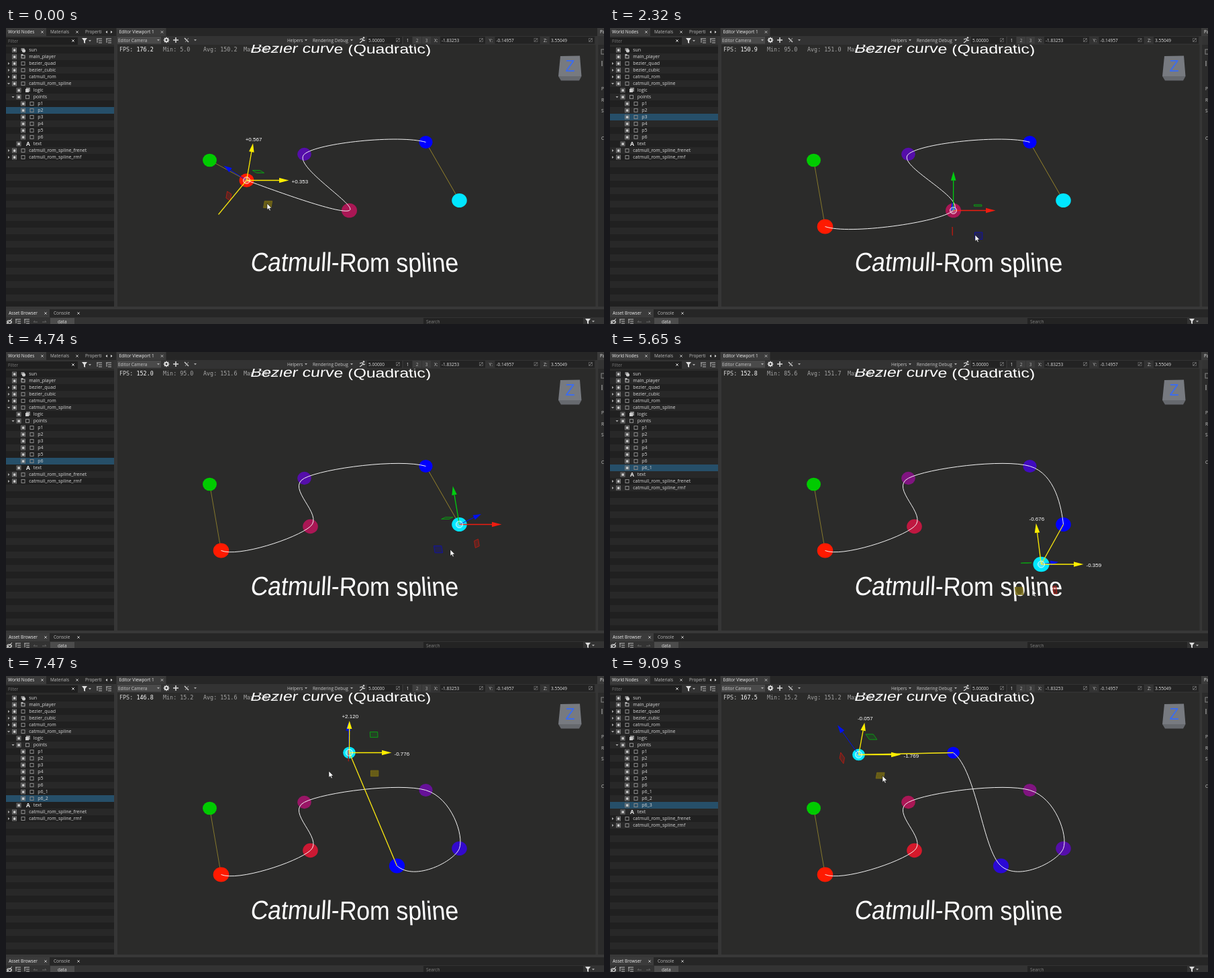
An HTML page with a canvas that plays this animation: 891 by 442 pixels, repeating every 9.19 s.

```html
<!DOCTYPE html>
<html lang="en">
<head>
<meta charset="utf-8">
<title>Catmull-Rom spline editor</title>
<style>
html, body { margin: 0; width: 100%; height: 100%; overflow: hidden; background: #2b2b2a; }
canvas { display: block; }
</style>
</head>
<body>
<canvas id="stage" width="891" height="442"></canvas>
<script>
const ctx = document.getElementById('stage').getContext('2d');
const LOOP = 9190, STEP = 100;
const UI = '"Open Sans", "Noto Sans", sans-serif';
const ARIAL = '"Liberation Sans", Arial, sans-serif';
const MONO = '"DejaVu Sans Mono", monospace';

const home = [[303, 197], [320, 296], [511, 272], [444, 188], [625, 170], [675, 257]];
// Each edit picks a point (new ones are duplicates), then drags it along a path.
const edits = [
  { point: 1, pick: 0, from: 0, to: 1000, origin: [316, 278], path: [[358, 227], home[1]], grip: [31, 35], unit: [119, 90] },
  { point: 2, pick: 1700, from: 2600, to: 3600, path: [home[2], [525, 266], [423, 255], [453, 260]], grip: [33, 37], unit: [93, 93] },
  { point: 5, pick: 4100 },
  { point: 6, pick: 4900, from: 5000, to: 5900, path: [home[5], [702, 350], [582, 283]], grip: [-13, 38], unit: [92, 88] },
  { point: 7, pick: 6100, from: 6600, to: 7500, path: [[582, 283], [511, 114]], grip: [-30, 28], unit: [91.5, 79.7] },
  { point: 8, pick: 7800, from: 8450, to: LOOP, path: [[511, 114], [370, 117]], grip: [36, 32], unit: [79.7, 53] }
];
const drags = edits.filter(e => e.path);

const clamp = u => Math.min(1, Math.max(0, u));
const smooth = u => u * u * (3 - 2 * u);
const add = (a, b) => [a[0] + b[0], a[1] + b[1]];
const mix = (a, b, u) => [a[0] + (b[0] - a[0]) * u, a[1] + (b[1] - a[1]) * u];

function pointAt(i, t) {
  const drag = drags.find(d => d.point === i);
  if (!drag) return home[i];
  const { path, from, to } = drag, last = path.length - 1;
  const u = clamp((t - from) / (to - STEP - from)) * last;
  const k = Math.min(last - 1, Math.floor(u));
  return mix(path[k], path[k + 1], smooth(u - k));
}

// Between drags the cursor goes to the next handle, by way of the tree if a row is clicked.
function cursorAt(t) {
  const next = drags.findIndex(d => d.to > t);
  const { point, from, grip, path } = drags[next];
  if (t >= from) return add(pointAt(point, t), grip);
  const before = drags[next - 1];
  const release = add(pointAt(before.point, t), before.grip);
  const handle = add(path[0], grip), arrive = from - 400;
  const click = edits.find(e => e.pick > before.to && e.point < home.length);
  if (!click || click.pick > from) return mix(release, handle, clamp((t - before.to) / (arrive - before.to)));
  const row = [51, 114 + click.point * 10], reach = click.pick - 200;
  return t < click.pick
    ? mix(release, row, clamp((t - before.to) / (reach - before.to)))
    : mix(row, handle, clamp((t - click.pick) / (arrive - click.pick)));
}

function rect(x, y, w, h, color) { ctx.fillStyle = color; ctx.fillRect(x, y, w, h); }
function frame(x, y, w, h, color) {
  ctx.strokeStyle = color; ctx.lineWidth = 1; ctx.strokeRect(x, y, w, h);
}
function label(s, x, y, color = '#c8c8c8', font = '6.5px ' + UI, align = 'left') {
  ctx.font = font; ctx.textAlign = align; ctx.fillStyle = color; ctx.fillText(s, x, y);
}
function path(pts, close) {
  ctx.beginPath();
  pts.forEach(([x, y]) => ctx.lineTo(x, y));
  if (close) ctx.closePath();
}
function poly(pts, color) { path(pts, true); ctx.fillStyle = color; ctx.fill(); }
function line(pts, color, width = 1) {
  path(pts); ctx.strokeStyle = color; ctx.lineWidth = width; ctx.stroke();
}
function disc(x, y, rx, ry, color) {
  ctx.beginPath(); ctx.ellipse(x, y, rx, ry, 0, 0, 7); ctx.fillStyle = color; ctx.fill();
}
const down = (x, y, c = '#aaa') => poly([[x - 2, y - 1], [x + 2, y - 1], [x, y + 1.5]], c);
const side = (x, y, d, c = '#aaa') => poly([[x - d, y - 2], [x + 1.5 * d, y], [x - d, y + 2]], c);
function cross(x, y, c = '#bbb') {
  line([[x - 1.7, y - 1.7], [x + 1.7, y + 1.7]], c);
  line([[x - 1.7, y + 1.7], [x + 1.7, y - 1.7]], c);
}
function funnel(x, y) {
  poly([[x - 4, y - 4], [x + 4, y - 4], [x + 1, y], [x + 1, y + 4], [x - 1, y + 3], [x - 1, y]], '#ddd');
  down(x + 8, y);
}
function treeIcon(x, y) {
  for (const d of [-3, 0, 3]) line([[x - (d < 0 ? 4 : 1), y + d], [x + 4, y + d]], '#bbb');
  line([[x - 3, y - 3], [x - 3, y + 3]], '#bbb');
}

// Text standing in perspective: verticals converge above the middle of the view.
function slantedText(s, x, y, size, sy, depth) {
  ctx.font = size + 'px ' + ARIAL; ctx.textAlign = 'left'; ctx.fillStyle = '#fff';
  const x0 = x;
  for (const ch of s) {
    ctx.setTransform(1, 0, (x - 540) / depth, sy, x, y + (x - x0) * .004);
    ctx.fillText(ch, 0, 0);
    x += ctx.measureText(ch).width;
  }
  ctx.resetTransform();
}

const nodeIcons = {
  sun(x, y) { rect(x - 3, y - 3, 5, 4, '#888'); disc(x + 1, y + 1, 2.6, 2.6, '#ccc'); },
  main_player(x, y) { frame(x - 2.5, y - 2, 5, 4, '#bbb'); rect(x - 3, y - 4, 3, 2, '#bbb'); },
  logic(x, y) { rect(x - 2, y - 4, 6, 6, '#888'); rect(x - 3, y - 2, 5, 5, '#ccc'); },
  text(x, y) { label('A', x + 1, y + 3, '#eee', 'bold 8.5px ' + UI, 'center'); }
};

function drawTree(selected, count) {
  for (let y = 28, i = 0; y < 416; y += 10, i++) rect(0, y, 161, 10, i % 2 ? '#282828' : '#202020');
  rect(0, 108 + selected * 10, 161, 10, '#264f69');
  const names = Array.from({ length: count }, (_, i) => i < 6 ? 'p' + (i + 1) : 'p6_' + (i - 5));
  // Leading spaces give the depth, + and - the state of a branch.
  const rows = ['sun', 'main_player', '+bezier_quad', '+bezier_cubic', '+catmull_rom',
    '-catmull_rom_spline', ' logic', ' -points', ...names.map(s => '  ' + s), ' text',
    '+catmull_rom_spline_frenet', '+catmull_rom_spline_rmf'];
  rows.forEach((row, i) => {
    const [, indent, state, name] = row.match(/^( *)([+-]?)(.*)/);
    const x = 12.5 + indent.length * 6.5, y = 33 + i * 10;
    if (state === '-') down(x - 8.5, y);
    if (state === '+') side(x - 8.5, y, 1);
    frame(x - 3, y - 3, 6, 6, '#777');
    rect(x - 1.7, y - 1.7, 3.6, 3.6, '#ccc');
    if (nodeIcons[name]) nodeIcons[name](x + 13, y);
    else frame(x + 10.5, y - 2.5, 5, 5, '#8b8b8b');
    label(name, x + 21.7, y + 2.3, '#d8d8d8', '7px ' + UI);
  });
}

function tab(x, w, s, active, y = 0, closable = true) {
  if (active) rect(x, y, w, 12, '#3b3b3b');
  label(s, x + 4, y + 8.3, active ? '#eee' : '#bbb');
  if (closable) cross(x + w - 6, y + 6);
}
function field(x, w, s) {
  rect(x, 13, w, 10.5, '#232323');
  label(s, x + 2, 20.5, '#ddd');
  frame(x + w - 8.5, 15.5, 5, 5, '#555');
  line([[x + w - 8, 20], [x + w - 4, 16]], '#888');
}
function menu(s, x, arrowX) { label(s, x, 20.5); down(arrowX, 18); }

function drawToolbar() {
  rect(166, 13, 65, 10.5, '#4a4a4a');
  menu('Editor Camera', 167, 227);
  for (let a = 0; a < 4; a++) {
    const c = Math.cos(a * Math.PI / 4) * 4.3, s = Math.sin(a * Math.PI / 4) * 4.3;
    line([[239 - c, 18 - s], [239 + c, 18 + s]], '#ddd', 1.6);
  }
  disc(239, 18, 3.2, 3.2, '#ddd'); disc(239, 18, 1.4, 1.4, '#333');
  line([[249, 18], [257, 18]], '#ddd', 1.5); line([[253, 14], [253, 22]], '#ddd', 1.5);
  line([[266, 15], [272, 21]], '#ccc', 1.5); line([[267, 21], [272, 15]], '#999');
  down(282, 18);
  menu('Helpers', 419, 447);
  menu('Rendering Debug', 457, 515);
  disc(533, 14.5, 1.3, 1.3, '#ddd');
  line([[527, 17], [531, 16], [533, 19], [535, 18]], '#ddd', 1.2);
  line([[532, 17], [530, 20], [527, 22]], '#ddd', 1.2);
  field(538, 52, '5.00000');
  for (let i = 0; i < 3; i++) {
    rect(592 + i * 14, 13, 13, 10.5, i ? '#3d3d3d' : '#292929');
    label(i + 1, 598.5 + i * 14, 20.5, i ? '#aaa' : '#ddd', undefined, 'center');
  }
  ['X-1.83253', 'Y-0.14957', 'Z3.55049'].forEach((s, i) => {
    label(s[0] + ':', 638 + i * 81.5, 20.5);
    field(647 + i * 81.5, 67, s.slice(1));
  });
}

function drawChrome() {
  rect(0, 0, 891, 12, '#262626');
  rect(0, 12, 891, 13, '#333');
  tab(-1, 61, 'World Nodes', true);
  tab(62, 50, 'Materials');
  tab(114, 30, 'Properti', false, 0, false);
  rect(145, 0, 17, 12, '#262626');
  side(150, 6, -1, '#ddd'); side(157, 6, 1, '#ddd');
  tab(164.5, 74, 'Editor Viewport 1', true);

  rect(0, 14, 107, 11, '#1f1f1f');
  label('Filter', 3, 22, '#777');
  cross(100, 19, '#ddd');
  funnel(117, 19); treeIcon(139, 19); treeIcon(153, 19);
  rect(161, 12, 5, 406, '#363636');
  drawToolbar();

  rect(878.5, 12, 4, 406, '#363636');
  rect(882.5, 25, 9, 393, '#2b2b2b');
  tab(881, 20, 'Pa', true, 0, false);
  frame(887, 32, 8, 7, '#888');
  line([[888, 49], [888, 57]], '#bbb');
  [...'PRS'].forEach((s, i) => label(s, 887, 93 + i * 16.5));
  label('C', 887, 167);

  rect(0, 416, 891, 4, '#383838');
  rect(0, 420, 891, 12, '#262626');
  tab(0, 65, 'Asset Browser', true, 420);
  tab(67, 47, 'Console', false, 420);
  rect(0, 432, 891, 10, '#333');
  disc(5, 439, 4, 3, '#bbb'); disc(5, 439, 2, 1.8, '#333');
  line([[1, 442], [9, 434]], '#ddd');
  treeIcon(18, 438); treeIcon(31, 438);
  line([[47, 439], [41, 439], [43, 437]], '#666');
  line([[54, 439], [60, 439], [58, 437]], '#666');
  rect(66, 433, 36, 9, '#4c4c4c');
  label('data', 77, 440.5, '#ddd');
  rect(622, 433, 238, 9, '#232323');
  label('Search', 626, 441, '#808080');
  funnel(867, 438);
}

function drawStats(t) {
  const noise = Math.sin(Math.floor(t / 300) * 12.9898) * 43758.5453 % 1;
  const fps = 150.2 + 4 * noise + 26 * Math.exp(-t / 250) + 18 * Math.exp((t - LOOP) / 300);
  const min = t < 1700 ? 5 : t < 5200 ? 95 : t < 6600 ? 85.6 : 15.2;
  const avg = 150.2 + 1.5 * Math.sin(Math.PI * t / 12000);
  const mono = (s, x, c = '#a5a5a5') => label(s, x, 35, c, '8.4px ' + MONO);
  mono('FPS:', 169, '#d0d0d0'); mono(fps.toFixed(1), 194.5, '#fff');
  mono('Min: ' + min.toFixed(1), 234);
  mono('Avg: ' + avg.toFixed(1), 294);
  mono('Max: 242.1', 354);
}

function drawCube() {
  poly([[826, 42], [855, 41.5], [857.5, 72], [823, 72]], '#777a80');
  poly([[823, 72], [857.5, 72], [854, 78.5], [827, 78.5]], '#66696e');
  label('Z', 840.5, 65, '#3b6cf0', '23px ' + ARIAL, 'center');
}

function dotColor(i, count) {
  if (i === 0) return '#00cb00';
  if (i === count - 1) return '#00e6ff';
  const u = (i - 1) / (count - 3);
  return `rgb(${255 * (1 - u)}, ${26 * (1 - u * u)}, ${255 * u})`;
}

function drawSpline(pts) {
  const n = pts.length;
  line([pts[0], pts[1]], '#85782c');
  line([pts[n - 2], pts[n - 1]], '#94822a');
  for (let k = 0; k < n; k++) {
    const i = (k + n - 1) % n, r = 7.8 + pts[i][1] * .0135;
    disc(...pts[i], r, r * .94, dotColor(i, n));
  }
  ctx.beginPath();
  ctx.moveTo(...pts[1]);
  for (let i = 1; i < n - 2; i++) {
    const [a, b, c, d] = pts.slice(i - 1, i + 3);
    ctx.bezierCurveTo(b[0] + (c[0] - a[0]) / 6, b[1] + (c[1] - a[1]) / 6,
      c[0] - (d[0] - b[0]) / 6, c[1] - (d[1] - b[1]) / 6, ...c);
  }
  ctx.strokeStyle = '#f4f4f4'; ctx.lineWidth = 1; ctx.stroke();
}

function arrow([x, y], [dx, dy], color, width) {
  const len = Math.hypot(dx, dy), ux = dx / len, uy = dy / len;
  const base = len - Math.min(len, Math.max(12, len * .23));
  const bx = x + ux * base, by = y + uy * base;
  line([[x, y], [bx, by]], color, width);
  poly([[x + dx, y + dy], [bx - uy * 3.8, by + ux * 3.8], [bx + uy * 3.8, by - ux * 3.8]], color);
}

function drawGizmo(p, drag) {
  const [x, y] = p;
  const ax = [63, 0];
  const ay = [(515 - x) / 16.5, -44 - (y - 60) * .067];
  const az = [(x - 520) * .21, (y - 333) * .205];
  const facing = x > 540 ? -.6 : .6;
  const plane = (a, ka, b, kb, color, fill) => {
    const corner = (s, q) => [
      x + a[0] * (ka + s) + b[0] * (kb + q), y + a[1] * (ka + s) + b[1] * (kb + q)];
    const k = .09;
    ctx.globalAlpha = fill;
    poly([corner(-k, -k), corner(k, -k), corner(k, k), corner(-k, k)], color);
    ctx.globalAlpha = 1;
    ctx.strokeStyle = color; ctx.lineWidth = 1; ctx.stroke();
  };
  arrow(p, az, '#0010f0', 1);
  plane(az, .6, ay, -.66, '#b01c14', .35);
  plane(ax, facing, az, .6, '#0c9a14', .2);
  plane(ax, facing, ay, -.65, drag ? '#776a14' : '#1212a0', drag ? .8 : .3);
  const origin = drag && (drag.origin || drag.path[0]);
  if (drag) line([origin, p], '#f0e010', 1.3);
  arrow(p, ax, drag ? '#ffee00' : '#f01c10', 1.3);
  arrow(p, ay, drag ? '#ffee00' : '#00cc10', 1.3);
  disc(x, y, 5, 5, 'rgba(255,255,255,.25)');
  ctx.strokeStyle = 'rgba(255,255,255,.8)'; ctx.lineWidth = 1; ctx.stroke();
  if (!drag) return;
  const signed = v => (v < 0 ? '' : '+') + v.toFixed(3);
  const font = '8px ' + ARIAL;
  label(signed((x - origin[0]) / drag.unit[0]), x + 67, y + 4, '#fff', font);
  label(signed((origin[1] - y) / drag.unit[1]), x + ay[0] + 1, y + ay[1] - 3.5, '#fff', font, 'center');
}

function drawCursor([x, y]) {
  const shape = [[0, 0], [0, 9.5], [2.2, 7.5], [3.8, 11], [5.3, 10.3], [3.8, 7], [6.8, 7]];
  poly(shape.map(d => add(d, [x, y])), '#fff');
  ctx.strokeStyle = '#111'; ctx.lineWidth = .6; ctx.stroke();
}

function draw(now) {
  const t = Math.floor((now % LOOP + 10) / STEP) * STEP % LOOP;
  const selected = edits.filter(e => e.pick <= t).pop().point;
  const count = Math.max(home.length, selected + 1);
  const pts = Array.from({ length: count }, (_, i) => pointAt(i, t));

  rect(0, 0, 891, 442, '#2b2b2a');
  drawStats(t);
  slantedText('Bezier curve (Quadratic)', 363, 37, 25, .78, 790);
  slantedText('Catmull-Rom spline', 363, 363, 35.8, 1.1, 1040);
  drawCube();
  ctx.translate(.5, .5);
  drawSpline(pts);
  drawGizmo(pts[selected], drags.find(d => t >= d.from && t < d.to));
  ctx.resetTransform();
  drawTree(selected, count);
  drawChrome();
  drawCursor(cursorAt(t));
}

let begin;
function tick(now) {
  begin ??= now;
  draw(now - begin);
  requestAnimationFrame(tick);
}
requestAnimationFrame(tick);
</script>
</body>
</html>
```
